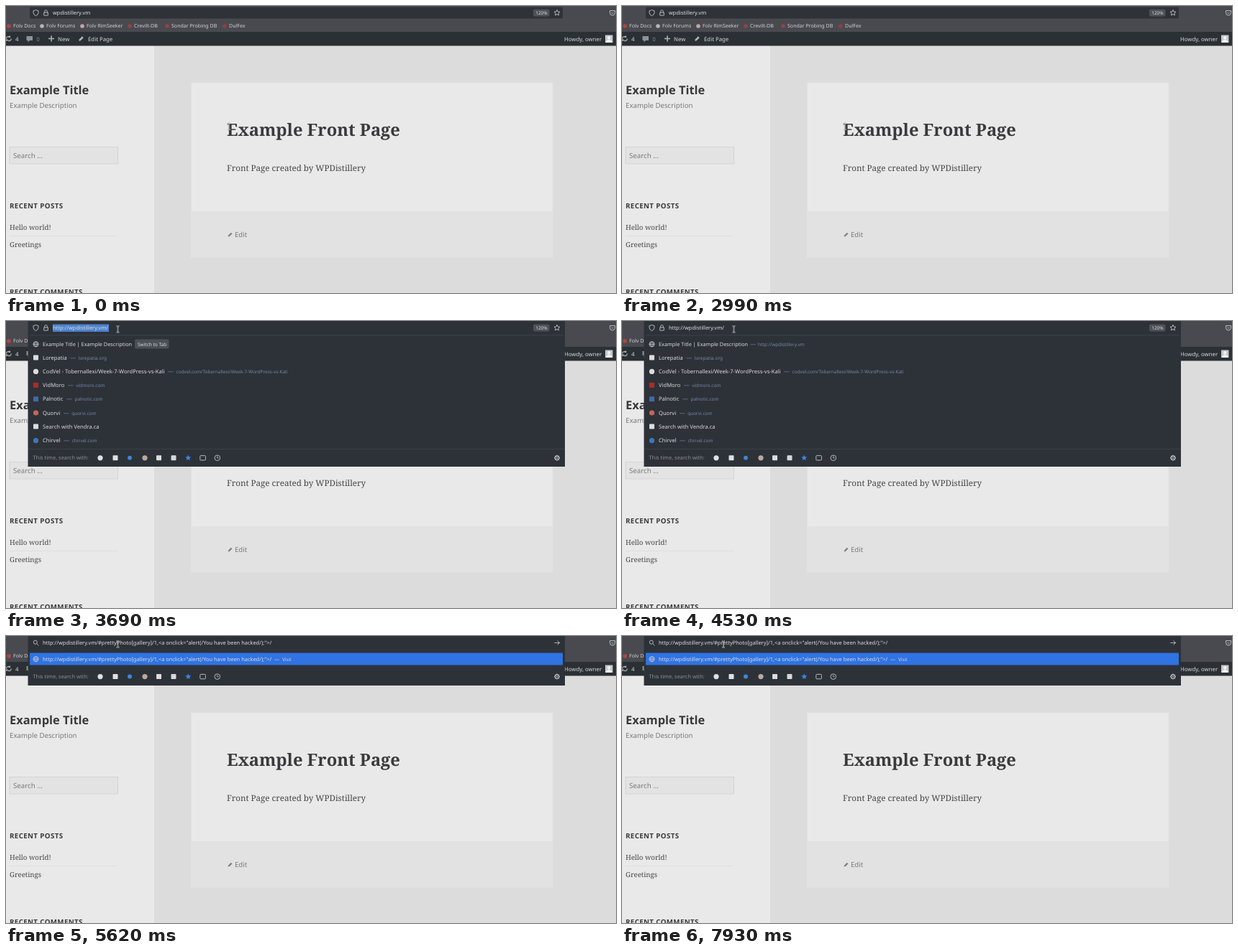
An HTML page for the animation above (8 s loop, 848 by 400 pixels).

```html
<!DOCTYPE html>
<html lang="en">
<head>
<meta charset="utf-8">
<title>Address bar</title>
<style>
  html, body { margin: 0; width: 100%; height: 100%; overflow: hidden; background: #dcdcdc; }
  svg { display: block; width: 848px; height: 400px; }
  text { font-family: "Noto Sans", sans-serif; white-space: pre; text-rendering: geometricPrecision; }
  .serif { font-family: "Noto Serif", serif; fill: #474747; }
  .bold { font-weight: 700; fill: #3a3a3c; }
  .soft { fill: #7a7a7a; }
  .mark { font-size: 7.05px; fill: #d0d0d3; }
  .bar { font-size: 7.8px; fill: #d8d9da; }
  .url { font-size: 7.43px; fill: #dcdde0; }
  .row { font-size: 7.4px; fill: #d8dadc; }
  .link { font-size: 6.47px; fill: #7787a8; }
  .line { fill: none; stroke: #c3c5c8; stroke-width: .9; }
  .faint { opacity: .55; }
  .idle, .open, .picked, .plain, .pasted, .before { opacity: 0; animation: 8s step-end infinite; }
  .idle { animation-name: idle; }
  .open { animation-name: open; }
  .picked { animation-name: picked; }
  .plain { animation-name: plain; }
  .before { animation-name: before; }
  .pasted { animation-name: pasted; }
  .cursor { animation: cursor 8s linear infinite; }
  @keyframes idle { 0% { opacity: 1 } 38.25%, 100% { opacity: 0 } }
  @keyframes open { 0% { opacity: 0 } 38.25% { opacity: 1 } 66.75%, 100% { opacity: 0 } }
  @keyframes picked { 0% { opacity: 0 } 38.25% { opacity: 1 } 48.75%, 100% { opacity: 0 } }
  @keyframes plain { 0% { opacity: 0 } 48.75% { opacity: 1 } 66.75%, 100% { opacity: 0 } }
  @keyframes before { 0% { opacity: 1 } 66.75%, 100% { opacity: 0 } }
  @keyframes pasted { 0% { opacity: 0 } 66.75%, 100% { opacity: 1 } }
  @keyframes cursor {
    0%, 38.24% { transform: translate(310px, 168px) }
    38.25%, 86.5% { transform: translate(155.5px, 11.5px) }
    88.6%, 100% { transform: translate(141px, 11.5px) }
  }
</style>
</head>
<body>
<svg id="stage" viewBox="0 0 848 400"></svg>
<script>
const text = (x, y, label, cls, size) =>
  `<text x="${x}" y="${y}" class="${cls}"${size ? ` style="font-size:${size}px"` : ''}>${label}</text>`;
const rect = (x, y, w, h, fill, extra = '') =>
  `<rect x="${x}" y="${y}" width="${w}" height="${h}" fill="${fill}" ${extra}/>`;
const dot = (x, y, r, fill) => `<circle cx="${x}" cy="${y}" r="${r}" fill="${fill}"/>`;
const disc = (x, y, fill) => dot(x, y, 3.6, fill);
const square = (x, y, fill) => rect(x - 3.5, y - 3.5, 7, 7, fill, 'rx=".8"');
const path = (d, extra = 'class="line"') => `<path d="${d}" ${extra}/>`;
const group = (cls, ...parts) => `<g class="${cls}">${parts.join('')}</g>`;
const at = (x, y, ...parts) => `<g transform="translate(${x} ${y})">${parts.join('')}</g>`;

const globe = (x, y) => at(x, y, path('M-3.6 0a3.6 3.6 0 1 0 7.2 0a3.6 3.6 0 1 0 -7.2 0M-3.6 0H3.6M0 -3.6Q-3.4 0 0 3.6Q3.4 0 0 -3.6'));
const pencil = (x, y, fill, scale) => at(x, y,
  path('M-3.5 3.5l.8-2.7L1.5-3.4l2 2L-.8 2.8z', `fill="${fill}" transform="scale(${scale})"`));
const starShape = Array.from({ length: 10 }, (_, i) => {
  const r = i % 2 ? 2 : 4.2, a = i * Math.PI / 5;
  return `${(r * Math.sin(a)).toFixed(2)} ${(-r * Math.cos(a)).toFixed(2)}`;
}).join('L');
const star = (x, y, extra) => at(x, y, path(`M${starShape}Z`, extra));

function page() {
  return [
    rect(0, 0, 848, 400, '#dcdcdc'),
    rect(0, 55, 206, 345, '#e9e9e9'),
    text(5, 122.8, 'Example Title', 'bold', 16.4),
    text(5, 142, 'Example Description', 'soft', 9.7),
    rect(5, 196.5, 150.5, 23.5, '#e3e3e3', 'stroke="#d4d4d4"'),
    text(10, 212, 'Search ...', 'soft', 9.7),
    `<g letter-spacing=".39">${text(5, 282.2, 'RECENT POSTS', 'bold', 9.73)}${text(5, 401.6, 'RECENT COMMENTS', 'bold', 9.73)}</g>`,
    text(5, 311.6, 'Hello world!', 'serif', 9.7),
    rect(5, 320, 149, 1, '#dedede'),
    text(5, 336.2, 'Greetings', 'serif', 9.7),
    rect(257.5, 107, 502.5, 243.5, '#e9e9e9', 'stroke="#e2e2e2"'),
    rect(258, 286, 502, 64.5, '#e2e2e2'),
    text(307, 181, 'Example Front Page', 'serif bold', 23.7),
    text(307, 230, 'Front Page created by WPDistillery', 'serif', 11.6),
    pencil(311.5, 318.7, '#808080', .85),
    text(318, 322, 'Edit', 'soft', 9.6)
  ].join('');
}

function browser() {
  const marks = [
    [10, 'Folv Docs', '#b5453f'], [56, 'Folv Forums', '#b4b5b8'], [112, 'Folv RimSeeker', '#c9a5a2'],
    [178, 'Crevilt-DB', '#8f4642'], [230, 'Sondar Probing DB', '#8f4642'], [310, 'DulFex', '#8f3f42']
  ];
  return [
    rect(0, 0, 848, 36, '#494a50'),
    rect(33, 1.5, 741, 16, '#2f3237', 'rx="2"'),
    ...marks.map(([x, name, color]) => dot(x - 6, 28, 2.8, color) + text(x, 30.4, name, 'mark')),
    at(843, 9.5, path('M-3.5-3H3.5V0a3.5 3.5 0 0 1-7 0zM-1.7-.7L0 1L1.7-.7')),
    rect(0, 36, 848, 19.5, '#2b3035'),
    at(3.5, 45.5, path('M-3 0a3 3 0 0 1 5-2.3M3.8 0a3.2 3.2 0 0 1-6 1.5M2-4v2H0M-3 3.5v-2h2', 'fill="none" stroke="#a9adb1" stroke-width="1.2"')),
    text(13, 48.6, '4', 'bar'),
    path('M28.5 42h8.5v6h-4l-2.5 2.5V48h-2z', 'fill="#8e9296"'),
    text(42.5, 48.6, '0', 'bar faint', 7.4),
    path('M63 41.5v8M59 45.5h8', 'stroke="#b0b4b7" stroke-width="1.6"'),
    text(72, 48.6, 'New', 'bar'),
    pencil(104.5, 45.5, '#b0b4b7', .95),
    text(114, 48.6, 'Edit Page', 'bar'),
    text(776, 48.6, 'Howdy, owner', 'bar'),
    rect(833, 40.5, 10.5, 10.5, '#c6c7c9'),
    dot(838.2, 44.2, 2.2, '#f2f2f2'),
    path('M834 51a4.2 4.2 0 0 1 8.4 0z', 'fill="#f2f2f2"')
  ].join('');
}

const panel = height => rect(30.5, -4, 746.5, height + 4, '#2d3238');

function searchStrip(y) {
  return [
    text(37.5, y + 2.6, 'This time, search with:', 'row faint'),
    disc(131, y, '#e0e0e0'), square(152, y, '#e0e0e0'), dot(172, y, 3, '#3d86d8'),
    disc(193, y, '#bba79e'), square(212.5, y, '#dcdcdc'), square(233, y, '#d8d8d8'),
    star(253.3, y, 'fill="#3f80e8"'),
    rect(269.8, y - 3.2, 7.6, 6.4, 'none', 'class="line" rx="1"'),
    at(293.8, y, path('M-3.8 0a3.8 3.8 0 1 0 7.6 0a3.8 3.8 0 1 0-7.6 0M0-2.2V.2H1.8')),
    at(766, y, path('M-2.7 0a2.7 2.7 0 1 0 5.4 0a2.7 2.7 0 1 0-5.4 0', 'fill="none" stroke="#c3c5c8" stroke-width="1.1"'),
      path('M0-4V4M-4 0H4M-2.8-2.8L2.8 2.8M2.8-2.8L-2.8 2.8', 'stroke="#c3c5c8" stroke-width="1.2" stroke-dasharray="1.2 5.6"'),
      dot(0, 0, 1, '#c3c5c8'))
  ].join('');
}

const trail = link => link &&
  `<tspan dx="4.5" class="link" style="font-size:8px">—</tspan><tspan dx="3.5" class="link">${link}</tspan>`;

function suggestions() {
  const repo = 'Tobernallexi/Week-7-WordPress-vs-Kali';
  const rows = [
    [51, 'Lorepatia', 'lorepatia.org', square, '#dcdcdc'],
    [70.4, `CodVel - ${repo}`, `codvel.com/${repo}`, disc, '#dcdcdc'],
    [89.5, 'VidMoro', 'vidmoro.com', square, '#b0282c'],
    [108.7, 'Palnotic', 'palnotic.com', square, '#4568a8'],
    [128, 'Quorvi', 'quorvi.com', disc, '#c2675a'],
    [147, 'Search with Vendra.ca', '', square, '#dcdcdc'],
    [166.7, 'Chirvel', 'chirvel.com', disc, '#3c78b6']
  ];
  return [
    panel(203),
    rect(33, 19.5, 742, .8, '#40454c'),
    globe(41.5, 32.3),
    text(51, 34.9, 'Example Title | Example Description', 'row', 7.3),
    group('picked', rect(179, 25.5, 47.5, 13, '#4b5056', 'rx="1.5"'), text(183, 34.6, 'Switch to Tab', 'row', 6.5)),
    group('plain', text(178, 34.8, '—', 'link', 8), text(189, 34.7, 'http://wpdistillery.vm', 'link')),
    ...rows.map(([y, title, link, icon, color]) =>
      icon(41.5, y, color) + text(51, y + 2.7, title + trail(link), 'row', 7.6)),
    rect(31, 178, 746, .8, '#40454c'),
    searchStrip(190.8)
  ].join('');
}

function addressBar() {
  const site = 'http://wpdistillery.vm/';
  return group('before',
      at(41.5, 9.5, path('M0-4L3.5-2.8V0Q3.2 2.8 0 4.2Q-3.2 2.8-3.5 0V-2.8z')),
      at(55.5, 9.5, path('M-2.8-.4H2.8V3.6H-2.8zM-1.8-.4V-2a1.8 1.8 0 0 1 3.6 0V-.4')),
      rect(733, 4.5, 22.5, 10, '#4e5157', 'rx="2"'),
      text(736.3, 12, '120%', 'row', 6.4),
      star(766, 9.5, 'class="line"')) +
    group('idle', text(65, 12.3, 'wpdistillery.vm', 'url')) +
    group('picked', rect(65, 4.5, 78, 10.5, '#4b82cc')) +
    group('open', text(65, 12.3, site, 'url'));
}

function pastedState() {
  const pasted = 'http://wpdistillery.vm/#prettyPhoto[gallery]/1,&lt;a onclick="alert(/You have been hacked/);"&gt;/';
  return [
    panel(69),
    at(41.5, 9.5, path('M-3.2-.8a2.5 2.5 0 1 0 5 0a2.5 2.5 0 1 0-5 0M1.2 1.2L3.8 3.8')),
    text(51, 12.3, pasted, 'url'),
    at(766, 9.5, path('M-3.5 0H3.5M.6-2.9L3.5 0L.6 2.9')),
    rect(33, 23.5, 741, 17, '#3073e2', 'rx="1"'),
    globe(41.5, 32.2),
    text(51, 34.9, pasted, 'url'),
    text(373, 34.8, '—', 'row', 7),
    text(384, 34.6, 'Visit', 'row', 6.4),
    searchStrip(56.6)
  ].join('');
}

const beam = 'M-2-4.5Q0-4.5 0-3.5Q0-4.5 2-4.5M0-3.5V3.5M-2 4.5Q0 4.5 0 3.5Q0 4.5 2 4.5';
const cursor = group('cursor',
  path(beam, 'fill="none" stroke="#555" stroke-width="1.8" opacity=".45"'),
  path(beam, 'fill="none" stroke="#d8d8d8" stroke-width=".9"'));

document.getElementById('stage').innerHTML =
  page() + browser() + group('open', suggestions()) + addressBar() + group('pasted', pastedState()) + cursor;
</script>
</body>
</html>
```
